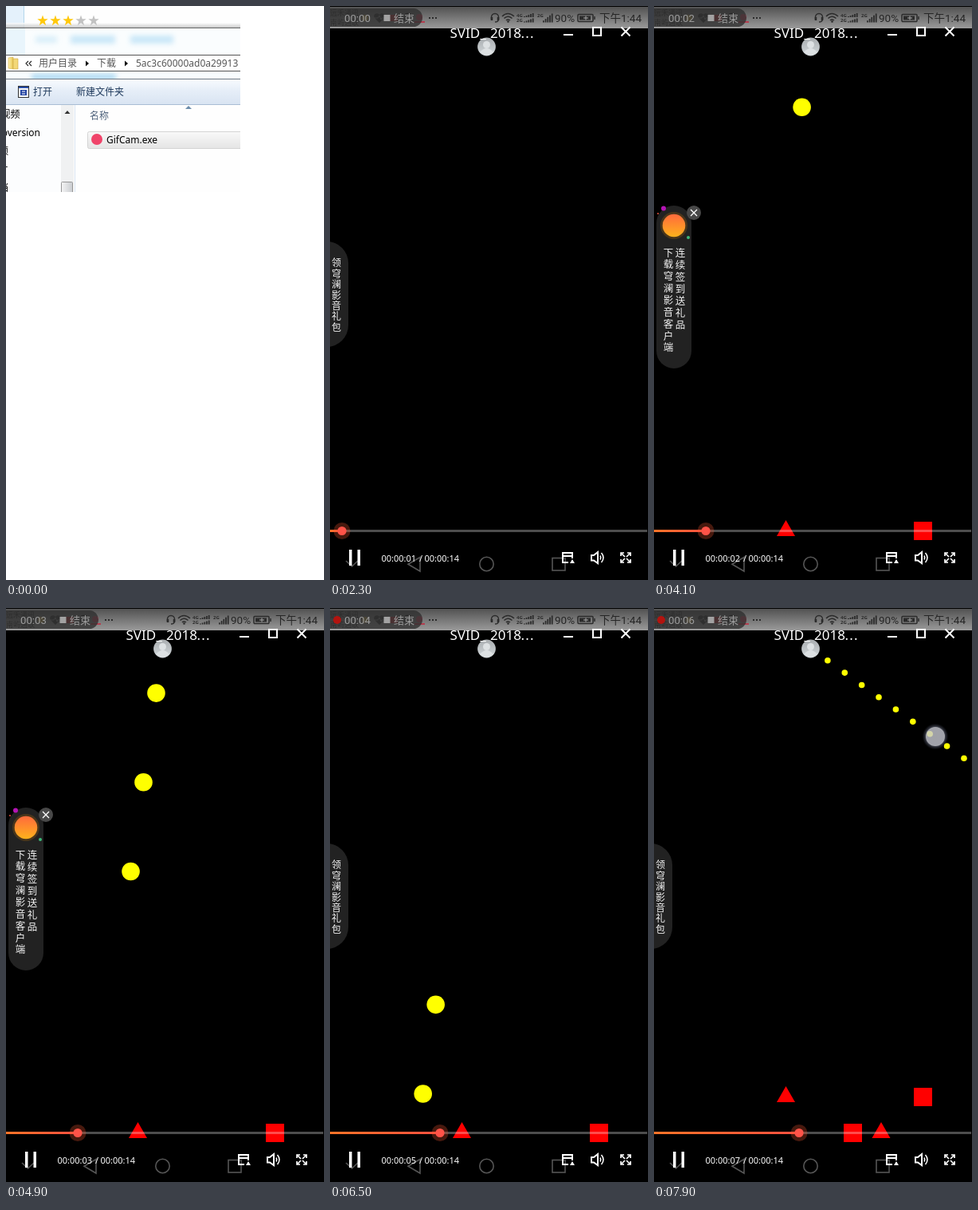
These frames come from a looping animation (399 px wide and 719 px high, 8 s). An HTML page:

```html
<!DOCTYPE html>
<html lang="zh">
<head>
<meta charset="utf-8">
<title>Screen recording</title>
<style>
html, body { margin: 0; width: 100%; height: 100%; overflow: hidden; background: #fff; }
svg { display: block; width: 399px; height: 719px; }
text { font-family: "Noto Sans", "Noto Sans CJK SC", "Noto Sans CJK", sans-serif; white-space: pre; }
.v { text-anchor: middle; fill: #f4f4f4; }
</style>
</head>
<body>
<svg id="stage" viewBox="0 0 399 719" xmlns="http://www.w3.org/2000/svg">
<defs>
  <clipPath id="corner"><rect width="294" height="233"/></clipPath>
  <filter id="soft" x="-30%" y="-80%" width="160%" height="260%"><feGaussianBlur stdDeviation="3"/></filter>
  <linearGradient id="edge" x2="0" y2="1"><stop stop-color="#fff"/><stop offset="1" stop-color="#bdbdbd"/></linearGradient>
  <linearGradient id="tools" x2="0" y2="1"><stop stop-color="#f8fbfe"/><stop offset=".45" stop-color="#e6eef8"/><stop offset="1" stop-color="#d9e4f2"/></linearGradient>
  <linearGradient id="row" x2="0" y2="1"><stop stop-color="#f9f9f9"/><stop offset="1" stop-color="#e4e4e4"/></linearGradient>
  <linearGradient id="thumb"><stop stop-color="#f5f5f5"/><stop offset="1" stop-color="#c9ccd0"/></linearGradient>
  <linearGradient id="folder"><stop stop-color="#fdf0ae"/><stop offset="1" stop-color="#e9c752"/></linearGradient>
  <linearGradient id="status" x2="0" y2="1"><stop stop-color="#525252"/><stop offset="1" stop-color="#9a9a9a"/></linearGradient>
  <linearGradient id="face" x2="0" y2="1"><stop stop-color="#a9adb0"/><stop offset="1" stop-color="#d3d9dc"/></linearGradient>
  <linearGradient id="gift" x2="0" y2="1"><stop stop-color="#ff6a3c"/><stop offset="1" stop-color="#ffb21c"/></linearGradient>
  <linearGradient id="played"><stop stop-color="#ff7428"/><stop offset="1" stop-color="#ff5040"/></linearGradient>
  <radialGradient id="glow"><stop offset=".7" stop-color="#7d8296" stop-opacity=".6"/><stop offset="1" stop-color="#3a3f55" stop-opacity="0"/></radialGradient>
  <radialGradient id="finger"><stop stop-color="#f4f4f4"/><stop offset=".8" stop-color="#f6f6fa"/><stop offset="1" stop-color="#fff"/></radialGradient>
</defs>

<g id="desk" clip-path="url(#corner)">
  <rect width="294" height="233" fill="#fefefe"/>
  <rect width="22" height="27" fill="#e4f1fb"/>
  <path d="M22.5 0V27" stroke="#b5d6ec"/>
  <rect y="21" width="294" height="6" fill="url(#edge)" opacity=".8"/>
  <g id="stars"></g>
  <path d="M0 27.5H294" stroke="#666"/>
  <rect y="28" width="294" height="33" fill="#fafdfe"/>
  <rect y="28" width="24" height="33" fill="#e9f5fc"/>
  <g filter="url(#soft)" fill="#b9e0f6" opacity=".75">
    <rect x="37" y="38" width="27" height="8" opacity=".7"/>
    <rect x="81" y="37" width="56" height="10"/>
    <rect x="156" y="37" width="54" height="10"/>
  </g>
  <rect y="82" width="294" height="10" fill="#f8fcfe"/>
  <rect x="32" y="85" width="106" height="8" fill="#8ecbee" filter="url(#soft)" opacity=".7"/>
  <rect x="-1" y="61.5" width="296" height="20" fill="#fff" stroke="#555"/>
  <path d="M3 65L9 64V79L3 78Z" fill="url(#folder)" stroke="#d4b14b" stroke-width=".6"/>
  <path d="M9 66H15V79H9Z" fill="#f3d877" stroke="#c9a743" stroke-width=".6"/>
  <path d="M28 69L25 72L28 75M32 69L29 72L32 75" fill="none" stroke="#222" stroke-width="1.1"/>
  <path d="M100 68.5L104 72L100 75.500ZM149 68.5L153 72L149 75.500Z"/>
  <g font-size="12" fill="#555">
    <text x="41" y="76.300">用户目录</text>
    <text x="114" y="76.300">下载</text>
    <text x="163" y="76.300">5ac3c60000ad0a29913</text>
  </g>
  <rect y="92" width="294" height="31" fill="url(#tools)"/>
  <path d="M0 91.500H294" stroke="#707a84"/>
  <path d="M0 123.500H294" stroke="#a9bdd4"/>
  <rect x="15.500" y="100.500" width="13" height="14" fill="#fff" stroke="#333"/>
  <path d="M16 102H28" stroke="#2a4fa8" stroke-width="2"/>
  <path d="M18 105H26V112H18Z" fill="#2747a5"/>
  <path d="M20 107H24M20 110H24" stroke="#fff"/>
  <g font-size="12" fill="#1e395b">
    <text x="34" y="112">打开</text>
    <text x="88" y="112">新建文件夹</text>
  </g>
  <rect y="124" width="69" height="109" fill="#fcfdfe"/>
  <g font-size="12" text-anchor="end">
    <text x="17.500" y="140">视频</text>
    <text x="43" y="163">oversion</text>
    <text x="3" y="186">视频</text>
    <text x="3" y="209">图片</text>
    <text x="3" y="232">文档</text>
  </g>
  <rect x="69" y="124" width="16" height="109" fill="#f0f1f2"/>
  <path d="M73.500 135L77 131L80.500 135Z" fill="#333"/>
  <rect x="69.500" y="220.500" width="14" height="16" rx="1" fill="url(#thumb)" stroke="#979797"/>
  <path d="M86.500 124V233" stroke="#d9e5f2"/>
  <text x="105" y="142" font-size="12" fill="#4c607a">名称</text>
  <path d="M225 129L229 125L233 129Z" fill="#6b8cab"/>
  <rect x="102.500" y="157.500" width="200" height="21" rx="2" fill="url(#row)" stroke="#d4d4d4"/>
  <circle cx="114" cy="167" r="7" fill="#f0446a"/>
  <text x="126" y="172" font-size="12">GifCam.exe</text>
</g>

<g id="player">
  <rect width="399" height="719"/>
  <rect y="1" width="399" height="27" fill="url(#status)"/>
  <g font-size="9" fill="#242424">
    <text x="0" y="12">远禾通讯</text>
    <text x="0" y="24">南屿通联</text>
  </g>
  <circle cx="44" cy="15" r="4" fill="#b39a52"/>
  <path d="M62 21L56 15C53 11 59 7 62 11C65 7 71 11 68 15Z" fill="#2b2b2b"/>
  <path d="M55 15H60L62 12L64 17L65 15H69" fill="none" stroke="#808080"/>
  <rect x="72" y="11" width="13" height="8" rx="1" fill="#b1363a"/>
  <g fill="none" stroke="#2b2b2b" stroke-width="2.200">
    <circle cx="97.500" cy="12.500" r="3"/><path d="M95 15L90 20"/>
  </g>
  <circle cx="112" cy="14" r="4" fill="#b9475c"/>
  <path d="M106 20H119" stroke="#b53c4e" stroke-width="2"/>
  <path d="M124 15H134" stroke="#2b2b2b" stroke-width="2" stroke-dasharray="2 2"/>
  <g fill="none" stroke="#2b2b2b" stroke-width="1.500">
    <path d="M202.500 17V14A4.500 4.500 0 0 1 211.500 14V17C211 20 209 20 207 20"/>
    <path d="M203 14V18M211 14V18" stroke-width="2.500"/>
    <path d="M216 13Q223 6 231 13M218.500 15.500Q223 11 228.500 15.500M221 18Q223 16 226 18"/>
    <rect x="311" y="10.500" width="19" height="9" rx="1"/>
    <path d="M332 13V17"/>
  </g>
  <circle cx="223.500" cy="19.500" r="1.300" fill="#2b2b2b"/>
  <rect x="313" y="12.500" width="14" height="5" fill="#2b2b2b"/>
  <path d="M318 15H324M321 12.500V17.500" stroke="#aaa"/>
  <g font-size="6" font-weight="bold" fill="#2b2b2b">
    <text x="234" y="13.500">4G</text><text x="234" y="20">2G</text><text x="260" y="13.500">2G</text>
  </g>
  <g id="bars" fill="#2b2b2b"></g>
  <text x="282" y="19.500" font-size="13.500" style="font-family:Roboto,sans-serif" fill="#262626">90%</text>
  <text x="338" y="20" font-size="13.500" style="font-family:Roboto,'Noto Sans CJK SC','Noto Sans CJK',sans-serif" fill="#262626">下午1:44</text>

  <g id="rec">
    <path d="M0 3H104.500A11.500 11.500 0 0 1 104.500 26H0Z" fill="#303030" opacity=".8"/>
    <circle id="blink" cx="9" cy="15" r="5" fill="#b3140f"/>
    <text id="recTime" x="18" y="20" font-size="13.200" fill="#9c9c9c" style="font-family:Roboto,sans-serif"></text>
    <rect x="67.500" y="11" width="8" height="8" fill="#a2a2a2"/>
    <text x="80" y="20" font-size="13" fill="#9c9c9c">结束</text>
  </g>

  <g fill="none" stroke="#555" stroke-width="1.600">
    <path d="M20 695L27.500 702L35 695M113 690.500V708L98 699.200Z"/>
    <circle cx="196.500" cy="699" r="8.700"/>
    <rect x="279" y="691.500" width="16" height="15.500"/>
  </g>

  <g id="aim" fill="#ff0"></g>
  <g id="balls" fill="#ff0"></g>
  <g id="blocks" fill="#f00"></g>
  <rect y="656" width="398" height="3" fill="#fff" opacity=".3"/>
  <g>
    <circle cx="196.500" cy="51" r="11.400" fill="url(#face)"/>
    <circle cx="196.500" cy="48.500" r="4.500" fill="#dde1e3"/>
    <path d="M188 58Q196.500 48 205 58Q196.500 65 188 58Z" fill="#dde1e3"/>
  </g>
  <g id="touch">
    <circle r="16.500" fill="url(#glow)"/>
    <circle r="12" fill="url(#finger)" opacity=".5"/>
  </g>

  <g fill="#fff" font-size="17">
    <text x="150.500" y="39.500">SVID_</text>
    <text x="201" y="39.500">2018</text><text x="239.500" y="39.500" letter-spacing="1.200">...</text>
  </g>
  <g fill="none" stroke="#fff" stroke-width="2">
    <path d="M293 36H305M365.500 26.500L376.500 37.500M376.500 26.500L365.500 37.500"/>
    <rect x="330" y="27" width="10" height="10"/>
  </g>

  <g id="tab">
    <rect x="-31" y="295" width="54" height="132" rx="27" fill="#222"/>
  </g>
  <g id="promo">
    <rect x="3" y="250" width="44" height="204" rx="22" fill="#222"/>
    <circle cx="25" cy="275" r="17" fill="#49361b"/>
    <circle cx="25" cy="275" r="14.300" fill="url(#gift)"/>
    <circle cx="12" cy="253.500" r="3" fill="#b414b4"/>
    <circle cx="5" cy="260" r="1" fill="#e8503c"/>
    <circle cx="43" cy="290" r="2" fill="#3cb878"/>
    <circle cx="50" cy="259" r="9" fill="#484848"/>
    <path id="close" d="M46 255L54 263M54 255L46 263" stroke-width="1.300"/>
  </g>

  <rect id="done" y="656" height="3" fill="url(#played)"/>
  <g id="knob">
    <circle cy="657.500" r="10.500" fill="#ff5a32" opacity=".28"/>
    <circle cy="657.500" r="5.600" fill="#ff5348"/>
  </g>
  <path id="play" d="M23 680L41 691L23 702Z" fill="#fff"/>
  <path id="pause" d="M24 681H27.500V701H24ZM34.500 681H38V701H34.500Z" fill="#fff"/>
  <g fill="#fff" font-size="11">
    <text id="clock" x="64.500" y="696"></text><text x="112" y="696">/</text><text x="118.500" y="696">00:00:14</text>
  </g>
  <g fill="none" stroke="#fff" stroke-width="2">
    <path d="M299 697H292V685H304V692M292 689H304"/>
    <path d="M328 688H331L336 684V698L331 694.500H328Z"/>
    <path d="M339 688.500Q340.500 691 339 693.500M340.500 685Q345.500 691 340.500 697" stroke-width="1.500"/>
    <path d="M365 689V685H369M373 685H377V689M377 693V697H373M369 697H365V693M366 686L370 690M376 686L372 690M376 696L372 692M366 696L370 692" stroke-width="1.700"/>
  </g>
  <path d="M301 698L304 693L307 698Z" fill="#fff"/>
</g>
</svg>

<script>
const $ = id => document.getElementById(id);
const show = (id, on) => $(id).setAttribute('display', on ? 'inline' : 'none');
const dot = (x, y, r) => `<circle cx="${x.toFixed(2)}" cy="${y.toFixed(2)}" r="${r}"/>`;
const pad = n => String(n).padStart(2, '0');

const LOOP = 8000, STEP = 100;
const GUN = { x: 196.5, y: 50.5 };
const PAUSES = [[2300, 2700], [7600, 7800]];
const PROGRESS = [[1700, 0], [2300, 15], [3300, 40], [4900, 90], [5800, 118], [6500, 138], [7900, 182]];
const DRAGS = [
  { from: 2900, to: 3800, path: [[2900, 190, 340], [3300, 168, 407], [3500, 234, 400], [3700, 143.5, 405]] },
  { from: 7800, to: 8000, path: [[7800, 345, 168], [7900, 353, 161]] }
];

// Linear interpolation of column c over rows that start with a time.
function along(keys, t, c = 1) {
  if (t <= keys[0][0]) return keys[0][c];
  for (let i = 1; i < keys.length; i++) {
    const a = keys[i - 1], b = keys[i];
    if (t <= b[0]) return a[c] + (b[c] - a[c]) * (t - a[0]) / (b[0] - a[0]);
  }
  return keys[keys.length - 1][c];
}

function star(cx, color) {
  const pts = Array.from({ length: 10 }, (_, i) => {
    const a = i * Math.PI / 5, r = i % 2 ? 2.8 : 7;
    return (cx + r * Math.sin(a)).toFixed(2) + ',' + (18.5 - r * Math.cos(a)).toFixed(2);
  });
  return `<polygon points="${pts.join(' ')}" fill="${color}"/>`;
}

function signal(x, base, height) {
  return [1, 2, 3, 4, 5].map(i => {
    const h = height * i / 5;
    return `<rect x="${x + (i - 1) * 2.7}" y="${base - h}" width="1.8" height="${h}"/>`;
  }).join('');
}

function column(text, x, y, step, size) {
  return [...text].map((ch, i) =>
    `<text class="v" x="${x}" y="${y + i * step + size * 0.37}" font-size="${size}">${ch}</text>`).join('');
}

const square = (x, y) => `<rect x="${x - 11}" y="${y - 11}" width="23" height="23"/>`;
const triangle = (x, y) => `<path d="M${x} ${y - 13}L${x + 11.5} ${y + 7}H${x - 11.5}Z"/>`;

$('stars').innerHTML = [0, 1, 2, 3, 4].map(i => star(46 + 16 * i, i < 3 ? '#ffc80a' : '#c2c2c2')).join('');
$('bars').innerHTML = signal(243, 14, 5) + signal(243, 20.5, 5) + signal(267, 20.5, 11);
$('tab').innerHTML += column('领穹澜影音礼包', 8, 322, 13.4, 12);
$('promo').innerHTML += column('下载穹澜影音客户端', 18, 309, 14.85, 12.5)
  + column('连续签到送礼品', 33, 309.5, 15, 12.5);

function drawAim(t) {
  const drag = DRAGS.find(d => t >= d.from && t < d.to);
  show('touch', drag);
  if (!drag) { $('aim').innerHTML = ''; return; }
  const x = along(drag.path, t), y = along(drag.path, t, 2);
  $('touch').setAttribute('transform', `translate(${x} ${y})`);
  const a = Math.atan2(y + 3 - GUN.y, x + 2 - GUN.x);
  let dots = '';
  for (let i = 1; i <= 10; i++)
    dots += dot(GUN.x + 26.3 * i * Math.cos(a), GUN.y + 26.3 * i * Math.sin(a), 3.8);
  $('aim').innerHTML = dots;
}

function drawBalls(p) {
  let balls = '';
  for (let i = 0; i < 3; i++) {
    const y = 330 + (p - 90) * 8.13 - 111.7 * i;
    if (y >= GUN.y && y <= 668) balls += dot(GUN.x - 0.143 * (y - GUN.y), y, 11.3);
  }
  $('balls').innerHTML = balls;
}

function drawBlocks(t) {
  if (t < 2700) { $('blocks').innerHTML = ''; return; }
  const raised = t >= 7200, slide = raised && t < 7300 ? 8 : 0;
  const y = (raised ? 612 : 657) + slide;
  $('blocks').innerHTML = triangle(165.5, y) + square(337, y)
    + (raised ? square(249, y + 45) + triangle(285, y + 45) : '');
}

function draw(now) {
  let t = Math.floor(now % LOOP / STEP) * STEP;
  const hold = PAUSES.find(([a, b]) => t >= a && t < b);
  if (hold) t = hold[0];

  show('desk', t < 1000);
  show('player', t >= 1000);
  show('play', t < 1600);
  show('pause', t >= 1600);

  const p = along(PROGRESS, t), sec = p * 14.5 / 399;
  $('done').setAttribute('width', p);
  $('knob').setAttribute('transform', `translate(${p} 0)`);
  $('clock').textContent = '00:00:' + pad(Math.round(sec));

  const rec = Math.max(0, sec - 0.1);
  show('rec', t >= 1800);
  show('blink', rec % 1 > 0.45);
  $('recTime').textContent = '00:' + pad(Math.floor(rec));

  const open = t >= 3000 && t < 6400;
  show('promo', open);
  show('tab', !open);
  $('close').setAttribute('stroke', t < 3600 ? '#999' : '#fff');

  drawAim(t);
  drawBalls(p);
  drawBlocks(t);
}

const start = performance.now();
function tick() {
  draw(performance.now() - start);
  requestAnimationFrame(tick);
}
draw(0);
requestAnimationFrame(tick);
</script>
</body>
</html>
```
